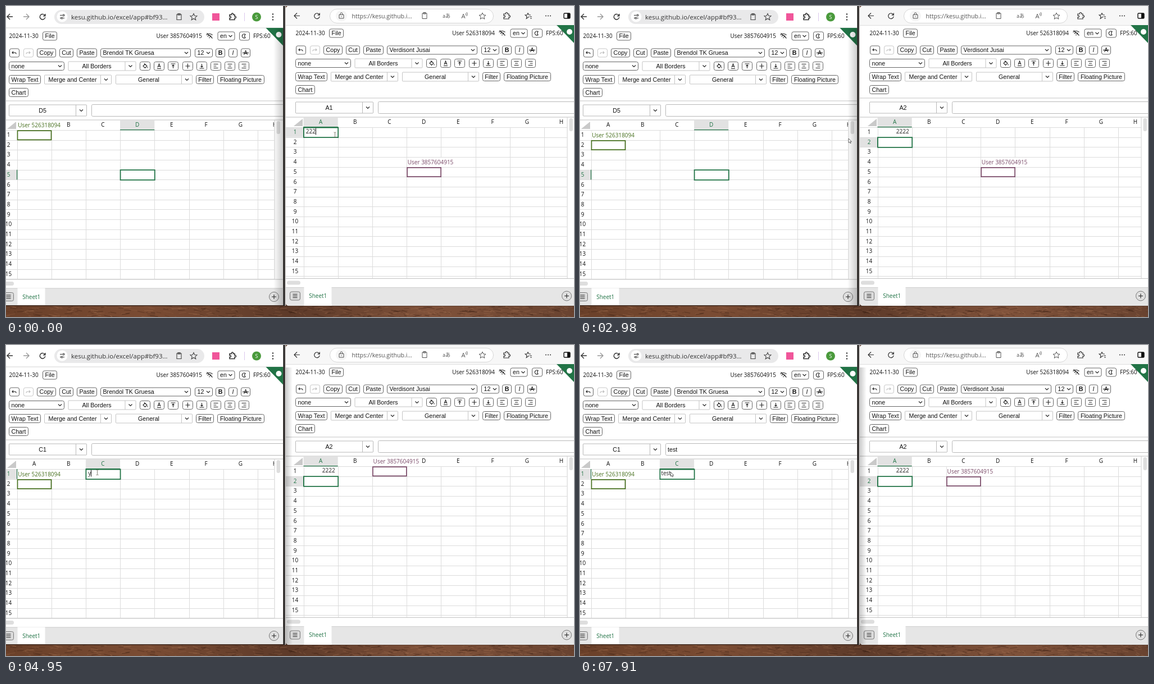
An HTML page with a canvas for the animation above (8000 ms loop, 1011 by 554 pixels).

```html
<!DOCTYPE html>
<html lang="en">
<head>
<meta charset="utf-8">
<title>Shared spreadsheet</title>
<style>
  html, body { margin: 0; width: 100%; height: 100%; overflow: hidden; background: #fff; }
  canvas { display: block; }
</style>
</head>
<body>
<canvas id="stage" width="1011" height="554"></canvas>
<script>
const c = document.getElementById('stage').getContext('2d');
const UI = '10px "Open Sans", "Noto Sans", sans-serif';
const FORM = '10.67px "Liberation Sans", Arial, sans-serif';
const GREEN = '#217346', LOOP = 8000;
const COL = 61.2, ROW = 17.68, GX = 19.5, GY = 221;
const USERS = {
  left: { name: 'User 3857604915', color: '#7a4a68' },
  right: { name: 'User 526318094', color: '#47701f' }
};

// Drawing helpers
function text(s, x, y, font = FORM, color = '#111', align = 'left') {
  c.font = font;
  c.fillStyle = color;
  c.textAlign = align;
  c.fillText(s, x, y + 0.36 * parseFloat(font.match(/[\d.]+px/)[0]));
}
function rect(x, y, w, h, fill) {
  c.fillStyle = fill;
  c.fillRect(x, y, w, h);
}
function box(x, y, w, h, r, stroke, fill, lw = 1) {
  c.beginPath();
  c.roundRect(x, y, w, h, r);
  if (fill) { c.fillStyle = fill; c.fill(); }
  if (stroke) { c.strokeStyle = stroke; c.lineWidth = lw; c.stroke(); }
}
function ink(x, y, d, color = '#333', lw = 1.1, fill) {
  const p = new Path2D(d);
  c.save();
  c.translate(x, y);
  if (fill) { c.fillStyle = fill; c.fill(p); }
  if (color) { c.strokeStyle = color; c.lineWidth = lw; c.stroke(p); }
  c.restore();
}
function disc(x, y, r, fill, stroke) {
  box(x - r, y - r, 2 * r, 2 * r, r, stroke, fill);
}
function clipped(x, y, w, h, r, draw) {
  c.save();
  c.beginPath();
  c.roundRect(x, y, w, h, r);
  c.clip();
  draw();
  c.restore();
}
const chevron = (x, y) => ink(x, y, 'M-3 -1.5L0 1.5L3 -1.5', '#222');

// Form controls, y is the vertical middle
function button(x, y, w, label, font, border = '#666') {
  box(x + 0.5, y - 7.5, w, 15, 3, border);
  if (label) text(label, x + w / 2 + 0.5, y, font, '#111', 'center');
}
function select(x, y, w, label) {
  button(x, y, w);
  text(label, x + 4.5, y);
  chevron(x + w - 7, y);
}
function combo(x, y, w, label, h = 16, border = '#c4c4c4') {
  box(x + 0.5, y - h / 2, w, h, 1, border);
  rect(x + w - 19, y - h / 2, 1, h, border);
  text(label, x + (w - 18) / 2, y, FORM, '#111', 'center');
  chevron(x + w - 9, y);
}

// Browser icons
const ICON = {
  back: 'M5 0H-5M0 -5L-5 0L0 5',
  forward: 'M-5 0H5M0 -5L5 0L0 5',
  reload: 'M4.5 -1.5A4.8 4.8 0 1 0 4.8 1M4.8 -5V-1.3H1.2',
  clip: 'M-4 -4.5H4V5H-4ZM-2 -6H2V-3.5H-2Z',
  star: 'M0 -6L1.8 -2L6 -1.7L2.8 1.1L3.8 5.3L0 3L-3.8 5.3L-2.8 1.1L-6 -1.7L-1.8 -2Z',
  puzzle: 'M-5 -4H-1.5A1.7 1.7 0 1 1 1.5 -4H4V-1A1.7 1.7 0 1 1 4 2V5H-5V2A1.7 1.7 0 1 0 -5 -1Z',
  tune: 'M-4 -2.5H0M-4 2.5H-2M2 2.5H4M4 -2.5A1.5 1.5 0 1 1 1 -2.5A1.5 1.5 0 1 1 4 -2.5M1 2.5A1.5 1.5 0 1 1 -2 2.5A1.5 1.5 0 1 1 1 2.5',
  lock: 'M-4 -1.5H4V5H-4ZM-2 -1.5V-3A2 2 0 0 1 2 -3V-1.5M0 1V2.5',
  favs: 'M-1 -5L.5 -1.8L4 -1.5M1 1.5L-3.8 5L-3 1L-6 -1.5L-2.4 -1.8L-1 -5M2 1.5H6M3 4.5H6'
};

function leftBar() {
  rect(0, 0, 494, 39, '#fff');
  rect(0, 38.5, 494, 1, '#d4d4d4');
  ink(7, 19, ICON.back, '#333', 1.4);
  ink(36, 19, ICON.forward, '#999', 1.4);
  ink(65, 19, ICON.reload, '#333', 1.5);
  box(86, 7, 267, 25, 12.5, null, '#e9e9ea');
  disc(100, 19, 9.5, '#fff');
  ink(100, 19, ICON.tune);
  text('kesu.github.io/excel/app#bf93…', 116, 19.5, '11.5px "Open Sans", sans-serif', '#333');
  ink(308, 19.5, ICON.clip, '#444');
  ink(334, 19.5, ICON.star, '#444');
  rect(367, 13, 13, 13, '#f0569a');
  ink(403, 19.5, ICON.puzzle, '#333', 1.5);
  rect(424, 12, 1, 15, '#dcc8ee');
  disc(446, 19.5, 8, '#4a9a3c');
  text('S', 446, 19.5, '9px "Open Sans", sans-serif', '#fff', 'center');
  for (const d of [-5, 0, 5]) disc(475, 19.5 + d, 1.2, '#333');
}

function rightBar() {
  rect(498, 0, 513, 35, '#f7f7f7');
  rect(498, 34, 513, 1, '#dedede');
  ink(518, 17.5, ICON.back, '#333', 1.2);
  ink(553.5, 17.5, ICON.reload, '#333', 1.2);
  box(576.5, 5.5, 291, 25, 12.5, '#d6d6d6', '#fff');
  disc(597, 17.5, 10, '#f5f5f5');
  ink(597, 17, ICON.lock, '#555', 1);
  text('https://kesu.github.i…', 615.5, 18, '10.6px "Open Sans", sans-serif', '#555');
  ink(745, 17.5, ICON.clip, '#555', 1);
  text('aあ', 784, 17.5, '9px "Noto Sans CJK JP", "Noto Sans CJK SC", sans-serif', '#555', 'center');
  text('A', 814, 18, '11px "Open Sans", sans-serif', '#555', 'center');
  ink(818, 15, 'M0 -2Q1.5 -.5 0 1.5M2 -4Q4.5 -.5 2 3', '#555', 0.9);
  ink(848, 18, ICON.star, '#555', 1);
  ink(891, 18, ICON.puzzle, '#333', 1.2);
  ink(930, 17.5, ICON.favs, '#333', 1.1);
  for (const d of [-4, 0, 4]) disc(965 + d, 17.5, 1, '#333');
  box(993, 13, 11, 9, 1.5, '#111', null, 1.4);
  rect(999, 13, 5, 9, '#111');
}

function toolbar(w) {
  const dr = w.right - 477.5;
  text('2024-11-30', 5.5, 53.5, UI);
  button(65, 53.5, 25, 'File');
  text(w.me.name, 349 + dr, 53.5, UI, '#111', 'right');
  ink(362 + dr, 53.5, 'M-5.5 -2Q0 -6 5.5 -2M-3.5 .5Q0 -2 3.5 .5M-1 3H1M-4.5 -5L5.5 4', '#222');
  select(376.5 + dr, 53.5, 30, 'en');
  button(415 + dr, 53.5, 18);
  ink(424 + dr, 53.5, 'M2 -3A3.6 3.6 0 1 0 2 3A4 4 0 0 1 2 -3Z', '#222');
  text('FPS:60', 440 + dr, 53.5, UI);
  ink(w.edge, 39, 'M-31 0H0V32Z', null, 0, GREEN);
  disc(w.edge - 8, 51, 5, '#fff');

  button(6, 83.5, 17);
  ink(14.5, 83.5, 'M-3.5 -.5H1.5Q3.5 -.5 3.5 2M-1.5 -2.5L-3.5 -.5L-1.5 1.5', '#222');
  button(31, 83.5, 17, '', FORM, '#c8c8c8');
  ink(39.5, 83.5, 'M3.5 -.5H-1.5Q-3.5 -.5 -3.5 2M1.5 -2.5L3.5 -.5L1.5 1.5', '#bbb');
  button(55, 83.5, 33, 'Copy');
  button(95, 83.5, 24, 'Cut');
  button(126, 83.5, 35, 'Paste');
  select(168, 83.5, 160, w.font);
  select(336, 83.5, 31, '12');
  button(373, 83.5, 16, 'B', 'bold ' + FORM);
  button(396, 83.5, 15, 'I', 'italic ' + FORM);
  button(418, 83.5, 16, 'A');
  rect(421, 83, 11, 1, '#111');

  select(5, 107, 98, 'none');
  combo(110.5, 107, 120, 'All Borders');
  const glyphs = [
    'M-3.5 0L0 -3.5L3.5 0L0 3.5ZM-1.5 -4.5L1 -2M4.5 1.5V3.5',
    'M-3.5 4.5H3.5M-2.5 2.5L0 -4L2.5 2.5M-1.5 .5H1.5',
    'M-4 -4H4M0 4V-2M-2 0L0 -2L2 0',
    'M-4 0H4M0 -4.5V4.5',
    'M-4 4H4M0 -4V2M-2 0L0 2L2 0',
    'M-4 -3.5H4M-4 0H1M-4 3.5H4',
    'M-4 -3.5H4M-2.5 0H2.5M-4 3.5H4',
    'M-4 -3.5H4M-1 0H4M-4 3.5H4'
  ];
  glyphs.forEach((d, i) => {
    const x = Math.round(238 + 25.2 * i);
    button(x, 107, 18);
    ink(x + 9.5, 107, d, '#222');
  });

  button(5, 131, 56, 'Wrap Text');
  combo(68, 131, 119, 'Merge and Center');
  combo(195, 131, 136, 'General');
  button(338, 131, 31, 'Filter');
  button(376, 131, 83, 'Floating Picture');
  button(5, 154, 34, 'Chart');

  rect(-12, 168.5, 520, 1, '#c4c4c4');
  combo(5, 186, 138, w.sel, 20, '#b8b8b8');
  box(152.5, 175.5, 400, 21, 2, '#b8b8b8');
  text(w.formula || '', 156, 186);
}

const cellX = id => GX + COL * (id.charCodeAt(0) - 65);
const cellY = id => GY + ROW * (id.slice(1) - 1);

function grid(w) {
  const { right, bottom } = w;
  const selCol = w.sel.charCodeAt(0) - 65, selRow = w.sel.slice(1) - 1;
  const sx = cellX(w.sel), sy = cellY(w.sel);
  rect(-12, 202.5, 520, 1, '#c0c0c0');
  clipped(-12, 203, right + 12, bottom - 203, 0, () => {
    rect(sx, 203.5, COL, GY - 203.5, '#e2e2e2');
    rect(-12, sy, GX + 12, ROW, '#e2e2e2');
    ink(18, 219, 'M0 0V-13L-16 0Z', null, 0, '#c9c9c9');
    for (let i = 0; i < 8; i++) {
      const x = GX + COL * i;
      rect(Math.round(x), GY, 1, 300, '#dcdcdc');
      text(String.fromCharCode(65 + i), x + COL / 2, 211.5, UI, i === selCol ? GREEN : '#111', 'center');
    }
    for (let i = 0; i < 16; i++) {
      const y = GY + ROW * i;
      rect(-12, Math.round(y), 520, 1, '#dcdcdc');
      text(i + 1, 4.5, y + 8.5, UI, i === selRow ? GREEN : '#111', 'center');
    }
    rect(sx, GY - 1, COL, 1.2, GREEN);
    rect(GX - 0.5, sy, 1.2, ROW, GREEN);

    for (const [id, value] of Object.entries(w.cells)) {
      const num = !isNaN(value);
      text(value, cellX(id) + (num ? COL - 5 : 2.5), cellY(id) + 7, UI, '#222', num ? 'right' : 'left');
    }

    box(sx + 0.5, sy + 0.5, COL, ROW, 0, GREEN, '#fff', 1.8);
    const shown = w.edit ?? w.cells[w.sel] ?? '';
    text(shown, sx + (w.edit == null ? 2.5 : 4.3), sy + 7, UI, '#222');
    if (w.edit != null && w.caret) rect(Math.round(sx + 4.5 + c.measureText(shown).width), sy + 1.5, 1, 12, '#111');

    const ox = cellX(w.peerSel), oy = cellY(w.peerSel);
    c.font = UI;
    rect(ox + 1, oy - 16.5, c.measureText(w.peer.name).width + 2, 16.5, '#fff');
    text(w.peer.name, ox + 1.7, oy - 8.7, UI, w.peer.color);
    box(ox + 1, oy + 1.2, COL - 1.2, ROW - 1.5, 0, w.peer.color, '#fff', 1.7);
  });
  rect(right, 203, 1, bottom - 203, '#d0d0d0');
  rect(-12, bottom - 0.5, 520, 1, '#c4c4c4');
  box(right + 4, 205, 6.5, 23, 3, null, '#dedede');
}

function footer(w) {
  const y = w.bottom + 31;
  box(-10, w.bottom + 4, 24, 7, 3.5, null, '#dedede');
  rect(-12, y - 15.5, 520, 60, '#e6e6e6');
  rect(-12, y - 15.5, 520, 1, '#cfcfcf');
  rect(20.5, y - 15.5, 49, 60, '#fff');
  text('Sheet1', 45.2, y, UI, GREEN, 'center');
  box(-4.5, y - 7.5, 18, 15, 3, '#777', '#dcdcdc');
  ink(4.5, y, 'M-4 -3H4M-4 0H4M-4 3H4', '#222');
  disc(w.right - 0.5, y, 8.5, '#e0e0e0', '#777');
  ink(w.right - 0.5, y, 'M-4 0H4M0 -4V4', '#222');
}

function app(w) {
  toolbar(w);
  grid(w);
  footer(w);
}

// Brown rock strip below the windows
function desktop() {
  const g = c.createLinearGradient(0, 0, 1011, 0);
  ['#6a4029', '#7b4c33', '#5d3a29', '#80523a', '#694330'].forEach((k, i) => g.addColorStop(i / 4, k));
  rect(0, 0, 1011, 554, g);
  let seed = 7;
  const rnd = () => (seed = (seed * 16807) % 2147483647) / 2147483647;
  for (let i = 0; i < 420; i++) {
    const x = rnd() * 1011, y = 533 + rnd() * 21, len = 3 + rnd() * 13;
    ink(x, y, `M0 0l${len} ${(rnd() - 0.4) * 6}`, rnd() < 0.55 ? 'rgba(45,22,12,.3)' : 'rgba(185,130,95,.25)', 0.6 + rnd());
  }
  rect(0, 533, 1011, 1.5, '#3f2a20');
}

function shade(x0, x1) {
  const g = c.createLinearGradient(x0, 0, x1, 0);
  g.addColorStop(0, 'rgba(0,0,0,0)');
  g.addColorStop(1, 'rgba(0,0,0,.2)');
  rect(Math.min(x0, x1), 40, Math.abs(x1 - x0), 493, g);
}

function pointer([, x, y, beam]) {
  if (beam) ink(x, y, 'M-2 -4.5H-.5L0 -4L.5 -4.5H2M0 -4V4M-2 4.5H-.5L0 4L.5 4.5H2', '#665', 0.8);
  else ink(x, y, 'M0 0V7.5L1.8 6L3 8.7L4.3 8.1L3.1 5.6H5.4Z', '#444', 0.8, '#fff');
}

// Timelines: [start in ms, value...]
const rightSel = [[0, 'A1'], [560, 'A2']];
const rightEdit = [[0, '222'], [140, '2222'], [560, null]];
const rightSeen = [[0, 'A1'], [690, 'A2']];
const leftSel = [[0, 'D5'], [3670, 'C1'], [6710, 'C2'], [7910, 'C1']];
const leftSeen = [[0, 'D5'], [3670, 'C1'], [6840, 'C2']];
const leftEdit = [[0, null], [4950, 'y'], [6050, ''], [6180, 't'], [6320, 'tes'], [6450, 'test'], [6710, null]];
const mouse = [
  [0, 585.5, 229.5, true], [420, 583.5, 227.5], [2980, 478, 236], [3110, 300, 236],
  [3240, 196.5, 233], [3400, 170, 228], [3520, 161.5, 226.5],
  [4950, 162.5, 227, true], [6710, 161.5, 226.5]
];
const step = (list, t) => list.findLast(k => k[0] <= t);
const at = (list, t) => step(list, t)[1];

function render(t) {
  desktop();
  clipped(0, 0, 493.5, 533, 0, () => {
    rect(0, 0, 494, 533, '#fff');
    leftBar();
    app({
      me: USERS.left, peer: USERS.right, font: 'Brendol TK Gruesa',
      right: 477.5, bottom: 487, edge: 493.5,
      sel: at(leftSel, t), edit: at(leftEdit, t), peerSel: at(rightSeen, t),
      caret: t < 5530 || t >= 5920, formula: t >= 7910 ? 'test' : '',
      cells: t >= 6710 ? { C1: 'test' } : {}
    });
  });
  rect(493.5, 0, 3, 534, '#1e1e1e');
  rect(496.5, 0, 1.5, 534, '#c4c4c4');
  clipped(498, 0, 520, 534, 5, () => {
    rect(498, 0, 513, 534, '#fff');
    rightBar();
    c.translate(510, -5);
    app({
      me: USERS.right, peer: USERS.left, font: 'Verdisont Jusai',
      right: 488.5, bottom: 490.5, edge: 501,
      sel: at(rightSel, t), edit: at(rightEdit, t), peerSel: at(leftSeen, t),
      caret: true, cells: t >= 560 ? { A1: '2222' } : {}
    });
  });
  // The active window casts its shadow on the other one
  if (t < 3670) shade(476, 493.5);
  else shade(510, 498);
  pointer(step(mouse, t));
}

const start = performance.now();
function frame() {
  render((performance.now() - start) % LOOP);
  requestAnimationFrame(frame);
}
frame();
</script>
</body>
</html>
```
